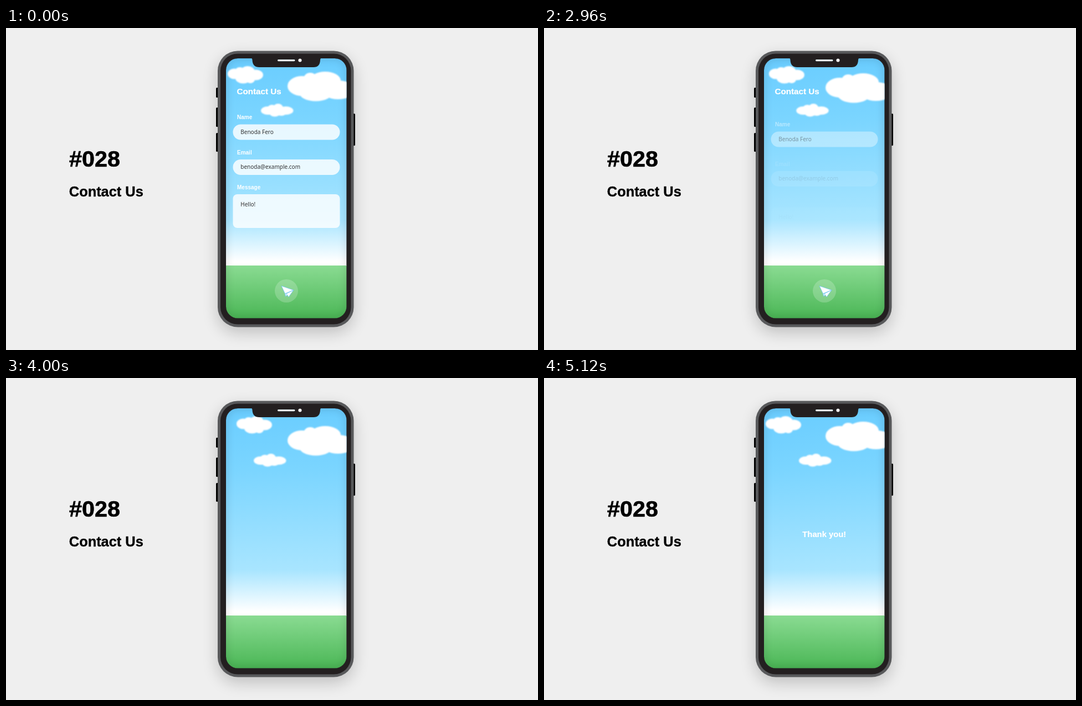
An HTML page with a canvas that plays this animation: 960x583 px, repeating every 7080 ms.

```html
<!DOCTYPE html>
<html lang="en">
<head>
<meta charset="utf-8">
<title>Contact Us</title>
<style>
  html, body { margin: 0; width: 100%; height: 100%; overflow: hidden; background: #efefef; }
  canvas { display: block; }
</style>
</head>
<body>
<canvas id="stage" width="960" height="583"></canvas>
<script>
const ctx = document.getElementById('stage').getContext('2d');
const LOOP = 7080, STEP = 40;
const ROUND = '"Arial Rounded MT Bold", "Liberation Sans", sans-serif';
const BOLD = '"Liberation Sans", Arial, sans-serif';
const PLAIN = '"Noto Sans", sans-serif';

const clamp = v => Math.min(1, Math.max(0, v));
const span = (t, start, length) => clamp((t - start) / length);
const mix = (a, b, p) => a + (b - a) * p;

// cubic-bezier(.25, .1, .25, 1)
function ease(x) {
  if (x <= 0 || x >= 1) return clamp(x);
  const curve = (a, b, u) => 3 * a * u * (1 - u) ** 2 + 3 * b * u * u * (1 - u) + u ** 3;
  let lo = 0, hi = 1;
  for (let i = 0; i < 24; i++) {
    const mid = (lo + hi) / 2;
    if (curve(.25, .25, mid) < x) lo = mid; else hi = mid;
  }
  return curve(.1, 1, lo);
}

function box(x, y, w, h, r) {
  ctx.beginPath();
  ctx.roundRect(x, y, w, h, r);
}

function fillBox(x, y, w, h, r, color) {
  box(x, y, w, h, r);
  ctx.fillStyle = color;
  ctx.fill();
}

function disc(x, y, r, color) {
  ctx.beginPath();
  ctx.arc(x, y, r, 0, 7);
  ctx.fillStyle = color;
  ctx.fill();
}

function text(str, x, y, font, color) {
  ctx.font = font;
  ctx.fillStyle = color;
  ctx.fillText(str, x, y);
}

// Bold heading with slightly softened corners
function heading(str, x, y, size, color) {
  text(str, x, y, `bold ${size}px ${ROUND}`, color);
  ctx.strokeStyle = color;
  ctx.lineWidth = size * .015;
  ctx.lineJoin = 'round';
  ctx.strokeText(str, x, y);
}

function fade(top, bottom, stops) {
  const g = ctx.createLinearGradient(0, top, 0, bottom);
  stops.forEach(([at, color]) => g.addColorStop(at, color));
  return g;
}

// Each puff: centre x, centre y, radius x, radius y
const CLOUDS = [
  [[412, 83, 12, 9.5], [422, 79, 9, 8], [436, 79, 13, 10], [451, 85, 13, 9.5], [428, 91, 14, 9.5], [441, 93, 8, 7]],
  [[534, 105, 26, 18], [549, 92, 12, 11], [576, 95, 28, 16], [599, 112, 30, 17], [559, 117, 30, 15.5]],
  [[472, 149.5, 12, 7.5], [480, 145, 8, 6], [491, 145, 9, 8], [505, 149.5, 13.5, 7.5], [485, 154, 10, 6.5], [497, 153, 9, 6]]
];

function cloud(puffs, dx, dy) {
  ctx.save();
  ctx.translate(dx, dy);
  ctx.filter = 'blur(1px)';
  ctx.fillStyle = '#fff';
  ctx.beginPath();
  for (const [x, y, rx, ry] of puffs) {
    ctx.moveTo(x + rx, y);
    ctx.ellipse(x, y, rx, ry, 0, 0, Math.PI * 2);
  }
  ctx.fill();
  ctx.restore();
}

function facet(points, color) {
  ctx.beginPath();
  points.forEach(([x, y]) => ctx.lineTo(x, y));
  ctx.closePath();
  ctx.fillStyle = color;
  ctx.fill();
  ctx.stroke();
}

function plane(x, y, scale) {
  const nose = [11, -1.5];
  ctx.save();
  ctx.translate(x, y);
  ctx.scale(scale, scale);
  ctx.strokeStyle = '#6cc3f2';
  ctx.lineWidth = .8;
  ctx.lineJoin = 'round';
  facet([nose, [-4.5, 5], [-3.5, 10]], '#d6effc');
  facet([nose, [-11, -9], [-4.5, 5]], '#fff');
  facet([nose, [-2, 5], [2, 11]], '#fff');
  ctx.restore();
}

function drawPlane(t) {
  if (t < 3640) {
    const p = span(t, 3080, 560) ** 2;
    plane(mix(508, 648, p), mix(476, 418, p), 1);
  } else if (t >= 4060 && t < 4420) {
    const p = (t - 4060) / 260;
    plane(mix(388, 507.5, p), mix(150, 111.5, p), .5);
  }
}

// Draws a group that slides down and fades out from the given time
function leaving(t, start, draw) {
  const p = ease(span(t, start, 350));
  if (p >= 1) return;
  ctx.save();
  ctx.globalAlpha = 1 - p;
  ctx.translate(0, 24 * p);
  draw();
  ctx.restore();
}

function field(label, value, top, height, radius, baseline) {
  text(label, 417, top - 9.5, `bold 10px ${BOLD}`, '#fff');
  fillBox(409.5, top, 193, height, radius, 'rgba(255,255,255,.82)');
  text(value, 423.3, top + baseline, `10px ${PLAIN}`, '#333');
}

function drawForm(t) {
  leaving(t, 2960, () => heading('Contact Us', 416.5, 119.7, 15.2, '#fff'));
  leaving(t, 2850, () => field('Name', 'Benoda Fero', 174.5, 28, 14, 17.2));
  leaving(t, 2755, () => field('Email', 'benoda@example.com', 238, 28, 14, 17.4));
  leaving(t, 2680, () => field('Message', 'Hello!', 301, 61, 8, 22));
}

function drawBody() {
  const parts = [[379, 108, 18], [379, 144, 35], [379, 190, 34], [626, 155, 58]];
  parts.forEach(([x, y, h]) => fillBox(x, y, 4, h, 1.5, '#000'));
  ctx.save();
  ctx.shadowColor = 'rgba(0,0,0,.2)';
  ctx.shadowBlur = 28;
  ctx.shadowOffsetY = 10;
  fillBox(382, 41.5, 245.5, 500, 36, '#58595b');
  ctx.restore();
  fillBox(387, 46.5, 235.5, 490, 31, '#231f20');
}

function drawNotch() {
  ctx.beginPath();
  ctx.moveTo(441, 54);
  ctx.quadraticCurveTo(444.5, 54.5, 444.5, 58);
  ctx.quadraticCurveTo(445, 71, 457, 71);
  ctx.lineTo(555, 71);
  ctx.quadraticCurveTo(566.5, 71, 567, 58);
  ctx.quadraticCurveTo(567, 54.5, 570.5, 54);
  ctx.closePath();
  ctx.fillStyle = '#231f20';
  ctx.fill();
  fillBox(490, 57, 31.5, 3.2, 1.6, '#c9eef2');
  fillBox(490.5, 57.5, 30.5, 2.2, 1.1, '#fff');
  disc(530.5, 58.5, 3, '#fff');
}

function innerShade() {
  ctx.save();
  box(395.5, 53.5, 220.5, 473.5, 23);
  ctx.lineWidth = 3;
  ctx.strokeStyle = '#231f20';
  ctx.shadowColor = 'rgba(0,0,0,.35)';
  ctx.shadowBlur = 14;
  ctx.stroke();
  ctx.restore();
}

function drawScreen(t) {
  ctx.save();
  box(397, 55, 217.5, 470.5, 21);
  ctx.clip();
  ctx.fillStyle = fade(55, 430, [[0, '#6acdff'], [.3, '#7bd5ff'], [.78, '#a8e5ff'], [.98, '#fff']]);
  ctx.fillRect(397, 55, 218, 376);
  ctx.fillStyle = fade(430, 526, [[0, '#8adb92'], [1, '#4ab655']]);
  ctx.fillRect(397, 430, 218, 96);
  innerShade();

  leaving(t, 2960, () => {
    ctx.setTransform(1, 0, 0, 1, 0, 0);
    disc(506, 476, 21, 'rgba(255,255,255,.2)');
  });
  drawPlane(t);

  const drift = t < 3995 ? ease(span(t, 2705, 1100)) : 1 - ease(span(t, 3995, 1100));
  cloud(CLOUDS[0], 16 * drift, 0);
  cloud(CLOUDS[1], 0, 8 * drift);
  cloud(CLOUDS[2], -13 * drift, 0);

  drawForm(t);

  const thanks = ease(span(t, 4860, 250));
  if (thanks > 0) {
    ctx.globalAlpha = thanks;
    heading('Thank you!', 466.3, 288.2, 14.8, '#fff');
  }
  ctx.restore();
  drawNotch();
}

function render(t) {
  ctx.fillStyle = '#efefef';
  ctx.fillRect(0, 0, 960, 583);
  heading('#028', 114, 251, 41.3, '#000');
  heading('Contact Us', 113.8, 304.5, 25.4, '#000');
  drawBody();
  drawScreen(t);
}

const began = performance.now();
function tick() {
  const t = (performance.now() - began) % LOOP;
  render(Math.floor(t / STEP) * STEP);
  requestAnimationFrame(tick);
}
tick();
</script>
</body>
</html>
```
